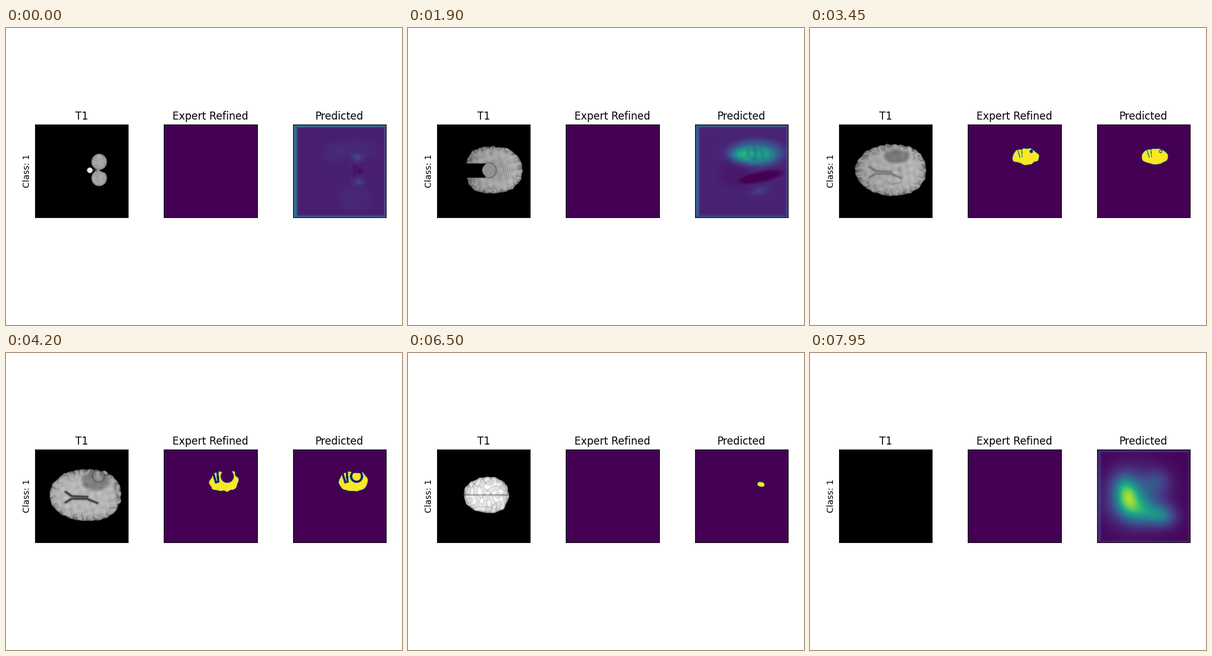
These frames come from a looping animation (640x480 px, 8000 ms). A matplotlib script:

```python
import numpy as np
import matplotlib.pyplot as plt
from matplotlib.animation import FuncAnimation

W, H, DPI = 640, 480, 100
FRAMES, INTERVAL = 160, 50
LEFT, TOP, SIDE, STEP = 46.9, 155.9, 150.3, 208.4
MID = 230
N = 240

cells = (np.arange(N) + 0.5) * SIDE / N
X, Y = np.meshgrid(LEFT + cells, TOP + cells)

rng = np.random.default_rng(4)
WAVES = [(f * (np.cos(a) * X + np.sin(a) * Y) + p, d) for f, a, p, d in zip(
    rng.uniform(0.4, 0.6, 10), rng.uniform(0, np.pi, 10),
    rng.uniform(0, 2 * np.pi, 10), rng.uniform(-0.2, 0.2, 10))]


def waves(n):
    """Smooth random texture that drifts from slice to slice."""
    return sum(np.cos(c + d * n) for c, d in WAVES) / np.sqrt(len(WAVES) / 2)


def ramp(n, a, b):
    return float(np.clip((n - a) / (b - a), 0, 1))


def hold(n, a, b, c, d):
    return ramp(n, a, b) * (1 - ramp(n, c, d))


def dome(n, mid, reach, power=2):
    """Radius of a rounded solid cut at slice n."""
    return np.sqrt(max(1 - abs((n - mid) / reach) ** power, 1e-4))


def dist(cx, cy):
    return np.hypot(X - cx, Y - cy)


def local(cx, cy, rx, ry, tilt=0):
    c, s = np.cos(np.radians(tilt)), np.sin(np.radians(tilt))
    dx, dy = X - cx, Y - cy
    return (dx * c + dy * s) / rx, (dy * c - dx * s) / ry


def gauss(*place):
    u, v = local(*place)
    return np.exp(-0.5 * (u * u + v * v))


def plateau(*place):
    u, v = local(*place)
    return np.exp(-(u * u + v * v) ** 3)


def depth_in(cx, cy, rx, ry, power=2, tilt=0):
    """Radial distance inside a superellipse."""
    u, v = local(cx, cy, rx, ry, tilt)
    rho = (np.abs(u) ** power + np.abs(v) ** power) ** (1 / power)
    return dist(cx, cy) * (1 / rho - 1)


def path(*pts):
    """Distance to a polyline."""
    best = np.full((N, N), 1e3)
    for (x0, y0), (x1, y1) in zip(pts, pts[1:]):
        dx, dy = x1 - x0, y1 - y0
        t = np.clip(((X - x0) * dx + (Y - y0) * dy) / (dx * dx + dy * dy), 0, 1)
        best = np.minimum(best, dist(x0 + t * dx, y0 + t * dy))
    return best


VENTRICLES = np.minimum(path((96, 225), (106, 232), (131, 233)),
                        path((96, 242), (106, 236), (130, 236), (147, 243)))
LOWER_ARC = path((122, 248), (132, 253), (147, 250))
SLITS = np.minimum(path((126, 194), (131, 210)), path((133, 189), (134.5, 209)))
CYST = dist(149, 200)
TURN = np.arctan2(Y - MID, X - 130)


def brain_depth(n):
    front = 60 * dome(n, 85, 61)
    back = 57 * dome(n, 62, 82)
    half = 42 * dome(n, 76, 70, 2.6)
    taper = 2.1 - 0.6 * np.exp(-((n - 56) / 12) ** 2)
    depth = np.where(X < 130, depth_in(130, MID, front, half, taper),
                     depth_in(130, MID, back, half, 2.4))
    if n < 48:
        grow = min(n, 36)
        for side in (-1, 1):
            lobe = depth_in(150 - 0.4 * grow, MID + side * (13 + 0.25 * grow),
                            13 + 0.7 * grow, 13.5 + 0.1 * grow)
            depth = np.maximum(depth, lobe - 4 * ramp(n, 36, 47))
    return depth


def lesion_depth(n):
    t, late = ramp(n, 52, 80), ramp(n, 84, 107)
    size = np.sqrt(hold(n, 42, 54, 114, 131))
    back = ramp(n, 112, 130)
    cx = 133 + 11 * t + 9 * back
    cy = 208.5 - 0.5 * t - 2 * late + 7 * back
    return depth_in(cx, cy, size * (18 + 5 * t) + 0.01, size * (6 + 10 * t) + 0.01,
                    2.2, 15 * late), size


def scan(n):
    w = waves(n)
    depth = brain_depth(n) + 0.5 * w * hold(n, 0, 20, 135, 146)

    # folds run inward from the rim, and all over the top slices
    rim = np.exp(-(np.maximum(depth, 0) / 10) ** 2) * ramp(n, 4, 30)
    radial = np.clip(-np.sin(24 * TURN + 1.7 * w) - 0.1, 0, 1)
    worms = np.exp(-(w / 0.28) ** 2) * ramp(n, 100, 126)
    tone = 0.6 + 0.27 * ((n - 42) / 88) ** 2
    img = tone * (1.08 - 0.1 * rim + 0.03 * w)
    img *= 1 - 0.38 * rim * radial * (1 - ramp(n, 112, 132))
    img *= 1 - 0.25 * worms
    img *= 0.75 + 0.25 * np.clip(depth / 4, 0, 1)
    img *= 1 + 0.003 * (X - 135) * hold(n, 10, 36, 55, 80)

    # cerebellum and brain stem
    early = 1 - ramp(n, 40, 52)
    if early:
        grow = ramp(n, 0, 38)
        area = plateau(150, MID, 20, 28 - 8 * grow)
        folds = np.cos(dist(137, MID) * 1.9 + 0.8 * w)
        img *= 1 - early * area * (0.1 + 0.1 * folds)
        opening = hold(n, 8, 30, 40, 50)
        cleft = np.minimum(12 * opening - np.abs(Y - MID - 1), 125 - X)
        img *= 1 - np.clip(cleft, 0, 1)
        notch = 0.35 * (X - 148) - np.abs(Y - MID - 1)
        img *= 1 - np.clip(notch, 0, 1) * (1 - ramp(n, 0, 16))
        stem = 5 + 6 * grow - dist(135 - 5 * grow, MID + 0.5)
        img *= 1 - 0.3 * opening * np.exp(-((stem + 1) / 1.2) ** 2)
        cover = np.clip(stem, 0, 1) * early
        img += cover * (0.92 - 0.35 * grow - img)
        depth = np.maximum(depth, np.where(cover > 0, stem, -9))

    inside, size = lesion_depth(n)
    img *= 1 - 0.3 * size * np.clip(inside / 7 + 0.3, 0, 1)
    cyst = hold(n, 66, 78, 90, 100)
    img *= 1 - 0.2 * cyst * np.exp(-((CYST - 9.5) / 1.4) ** 2)
    img += 0.1 * cyst * np.exp(-(CYST / 7) ** 4)

    img *= 1 - 0.72 * hold(n, 62, 78, 88, 102) * np.exp(-(VENTRICLES / 1.9) ** 2)
    basal = hold(n, 44, 52, 60, 72)
    img *= 1 - 0.5 * basal * np.exp(-(LOWER_ARC / 1.7) ** 2)
    img *= 1 - 0.45 * basal * gauss(146, 231, 4, 3)
    img *= 1 - 0.38 * ramp(n, 84, 104) * np.exp(-((Y - MID) / 1.2) ** 2)
    return np.clip(img, 0, 1) * np.clip(depth, 0, 1)


def mask(n, rough, cup=False):
    d, size = lesion_depth(n)
    d = d + rough * size * waves(n)
    gap = hold(n, 66, 78, 92, 102)
    if gap:
        d = np.minimum(d, np.minimum(CYST - 10.5 * gap, SLITS - 1.7 * gap))
        if cup:
            d = np.maximum(d, np.minimum(7 * gap - CYST, Y - 195))
    return (d > 0).astype(float)


def edge(gap, width):
    return 1 / (1 + np.exp((gap - width) * 1.6))


BORDER = np.max([edge(X - LEFT, 6), edge(Y - TOP, 5),
                 0.8 * edge(LEFT + SIDE - X, 3),
                 0.75 * edge(TOP + SIDE - Y, 2.5)], axis=0)
GRAIN = waves(0)
DOTS = np.cos(2 * np.pi * X / 5) * np.cos(2 * np.pi * Y / 5)

FAINT = (0.085 + 0.32 * BORDER + 0.01 * DOTS
         + 0.025 * (plateau(113, 203, 20, 17) + plateau(152, 197, 34, 17)
                    + plateau(146, 275, 27, 22))
         + 0.11 * (gauss(150, 210, 6, 4) + gauss(153, 249, 6, 4))
         - 0.06 * gauss(151, 231, 6, 3) + 0.015 * GRAIN * gauss(147, 231, 10, 14))

WARM = (0.1 + 0.22 * BORDER + 0.18 * plateau(145, 203, 46, 23)
        + 0.16 * plateau(143, 205, 35, 15) + 0.2 * gauss(122, 205, 12, 7)
        + 0.1 * gauss(160, 205, 10, 6) + 0.04 * GRAIN * gauss(138, 206, 20, 9)
        - 0.1 * plateau(154, 241, 37, 9, -12) - 0.03 * plateau(110, 235, 28, 25)
        + 0.09 * gauss(150, 264, 9, 4, -15))

BLOOM = (0.015 + 0.11 * BORDER + 0.35 * gauss(108, 234, 29, 29)
         + 0.5 * gauss(95, 230, 13, 20, -15) + 0.3 * gauss(125, 258, 26, 13, 12)
         + 0.2 * gauss(153, 263, 14, 12) + 0.13 * gauss(146, 207, 14, 13))


def predict(n):
    if n > 130:
        return FAINT + ramp(n, 131, 159) * (BLOOM - FAINT)
    haze = FAINT + ramp(n, 0, 38) * (WARM - FAINT)
    return np.maximum(haze * (1 - ramp(n, 39, 47)), mask(n, 0.4, cup=True))


def expert(n):
    return mask(n, 0.9) * (46 <= n <= 126)


fig = plt.figure(figsize=(W / DPI, H / DPI), dpi=DPI)
panels = []
for i, (title, cmap, make) in enumerate([("T1", "gray", scan),
                                         ("Expert Refined", "viridis", expert),
                                         ("Predicted", "viridis", predict)]):
    ax = fig.add_axes([(LEFT + i * STEP) / W, 1 - (TOP + SIDE) / H, SIDE / W, SIDE / H])
    ax.set_title(title, fontsize=12)
    ax.set_xticks([])
    ax.set_yticks([])
    if i == 0:
        ax.set_ylabel("Class: 1", fontsize=10)
    image = ax.imshow(np.zeros((N, N)), cmap=cmap, vmin=0, vmax=1, aspect="auto")
    panels.append((image, make))


def update(n):
    for image, make in panels:
        image.set_data(make(n))
    return [image for image, _ in panels]


anim = FuncAnimation(fig, update, frames=FRAMES, interval=INTERVAL,
                     repeat=True, repeat_delay=0, blit=False)
plt.show()
```
